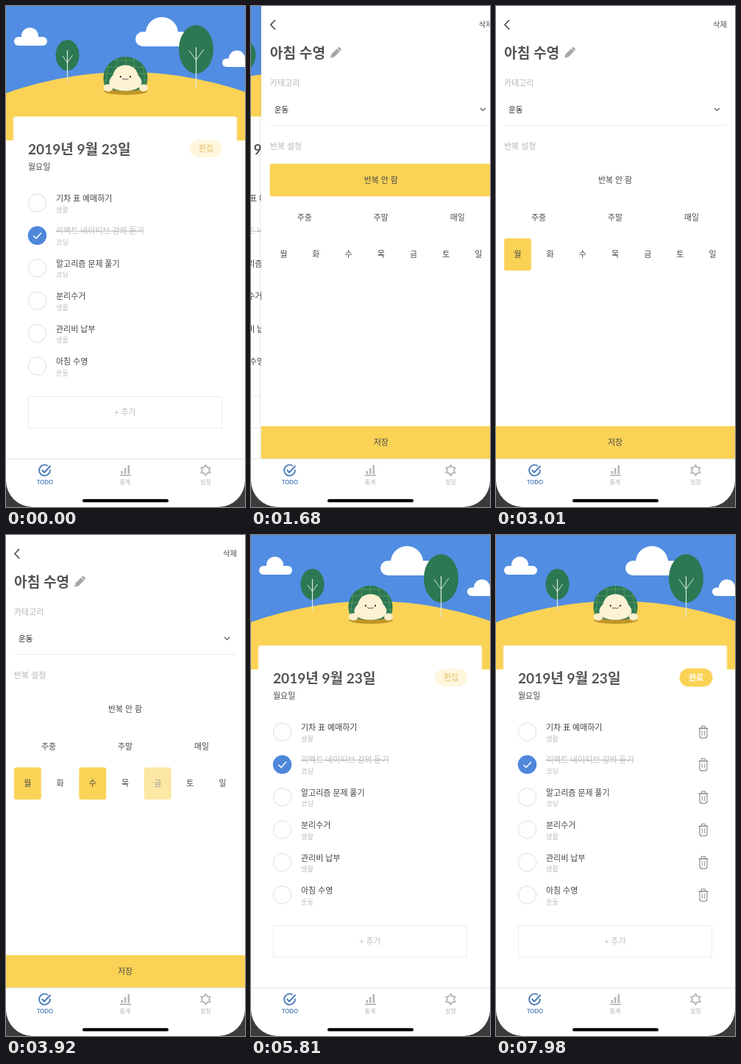
An HTML page with a canvas that plays this animation: 325x682 px, repeating every 8 s.

```html
<!DOCTYPE html>
<html lang="ko">
<head>
<meta charset="utf-8">
<title>Todo</title>
<style>
html, body { margin: 0; width: 100%; height: 100%; overflow: hidden; background: #fff; }
canvas { display: block; width: 325px; height: 682px; }
</style>
</head>
<body>
<canvas id="stage"></canvas>
<script>
const W = 325, H = 682, LOOP = 8000, TAB_Y = 616;
const YELLOW = '#fad255', BLUE = '#518de2', GREEN = '#2c7853', DARK = '#545454', GREY = '#b5b5b5';
const FONT = 'Lato, "Noto Sans CJK KR", "Noto Sans CJK JP", "Noto Sans", sans-serif';
const canvas = document.getElementById('stage');
const ctx = canvas.getContext('2d');
const ratio = window.devicePixelRatio || 1;
canvas.width = W * ratio;
canvas.height = H * ratio;

const clamp = v => Math.max(0, Math.min(1, v));
const inOut = v => v < 0.5 ? 2 * v * v : 1 - 2 * (1 - v) * (1 - v);
const outQuart = v => 1 - Math.pow(1 - v, 4);
const span = (t, start, length) => clamp((t - start) / length);

// Opacity of a touched control: down to 0.2, then back after release.
function touch(t, down, up) {
  const low = 1 - 0.8 * inOut(span(Math.min(t, up), down, 150));
  return low + (1 - low) * inOut(span(t, up, 250));
}

function text(str, x, cy, size, color, align = 'left', weight = 400) {
  ctx.font = `${weight} ${size}px ${FONT}`;
  ctx.textAlign = align;
  ctx.fillStyle = color;
  ctx.fillText(str, x, cy + size * 0.37);
}

function line(points, color, width = 1) {
  ctx.beginPath();
  points.forEach(([x, y], i) => i ? ctx.lineTo(x, y) : ctx.moveTo(x, y));
  ctx.strokeStyle = color;
  ctx.lineWidth = width;
  ctx.stroke();
}

function rect(x, y, w, h, color) {
  ctx.fillStyle = color;
  ctx.fillRect(x, y, w, h);
}

function pill(x, y, w, h, r, color) {
  ctx.beginPath();
  ctx.roundRect(x, y, w, h, r);
  ctx.fillStyle = color;
  ctx.fill();
}

function oval(x, y, rx, ry, color) {
  ctx.beginPath();
  ctx.ellipse(x, y, rx, ry, 0, 0, Math.PI * 2);
  ctx.fillStyle = color;
  ctx.fill();
}

function ring(x, y, r, color, width) {
  ctx.beginPath();
  ctx.arc(x, y, r, 0, Math.PI * 2);
  ctx.strokeStyle = color;
  ctx.lineWidth = width;
  ctx.stroke();
}

// Fades an area towards the white page.
function veil(x, y, w, h, opacity) {
  if (opacity < 1) rect(x, y, w, h, `rgba(255,255,255,${1 - opacity})`);
}

function yellowBox(x, y, w, h) {
  pill(x - 0.6, y - 0.6, w + 1.2, h + 1.2, 3.5, 'rgba(250,210,85,0.4)');
  pill(x, y, w, h, 3, YELLOW);
}

// A flat-bottomed pill with a round top sitting on it.
function cloud(x, y, w, h, bumpX, bumpY, r) {
  pill(x, y, w, h, h / 2, '#fff');
  ctx.beginPath();
  ctx.arc(bumpX, bumpY, r, Math.PI, Math.PI * 2);
  ctx.lineTo(bumpX + r, y + h / 2);
  ctx.lineTo(bumpX - r, y + h / 2);
  ctx.fill();
}

function tree(x, y, rx, ry, top, foot) {
  const pale = '#dcebd9', s = rx / 16;
  oval(x, y, rx, ry, GREEN);
  line([[x, top], [x, foot]], pale, 1.2);
  line([[x - 6.5 * s, y + s], [x, y + 10 * s]], pale, 1);
  line([[x + 7 * s, y], [x, y + 10 * s]], pale, 1);
}

function turtle() {
  oval(163, 116, 29.5, 5, '#bf9528');
  ctx.save();
  ctx.beginPath();
  ctx.ellipse(162.5, 97.5, 30, 28.5, 0, Math.PI, Math.PI * 2);
  ctx.quadraticCurveTo(193, 108, 186, 113);
  ctx.quadraticCurveTo(162.5, 118, 139, 113);
  ctx.quadraticCurveTo(132, 108, 132.5, 97.5);
  ctx.fillStyle = GREEN;
  ctx.fill();
  ctx.clip();
  for (let i = -2; i <= 2; i++) {
    const x = 162.5 + i * 11;
    line([[x, 68], [x + i * 3, 112]], '#6aa35a', 0.7);
    line([[130, 92 + i * 9], [195, 92 + i * 9]], '#6aa35a', 0.7);
  }
  ctx.restore();
  oval(139, 111.5, 6.5, 5, '#fbefcb');
  oval(187, 111.5, 6, 5, '#fbefcb');
  ctx.beginPath();
  ctx.moveTo(162.5, 80.5);
  ctx.bezierCurveTo(173, 80.5, 178, 87, 179.5, 94);
  ctx.bezierCurveTo(191, 106, 181, 115.5, 162.5, 115.5);
  ctx.bezierCurveTo(143, 115.5, 134, 106, 145.5, 94);
  ctx.bezierCurveTo(147, 87, 152, 80.5, 162.5, 80.5);
  ctx.fillStyle = '#fdf2d3';
  ctx.fill();
  oval(155.8, 96.3, 1, 1.2, '#222');
  oval(169, 96.3, 1, 1.2, '#222');
  ctx.beginPath();
  ctx.moveTo(158, 98.6);
  ctx.quadraticCurveTo(160, 101, 162.3, 99.2);
  ctx.quadraticCurveTo(164.6, 101, 166.6, 98.6);
  ctx.strokeStyle = '#444';
  ctx.lineWidth = 0.9;
  ctx.stroke();
}

function scenery() {
  rect(0, 0, W, 183, BLUE);
  ctx.save();
  ctx.beginPath();
  ctx.rect(0, 0, W, 183);
  ctx.clip();
  cloud(11, 42, 45, 12, 32.5, 41, 11.5);
  cloud(176, 35, 86, 20, 212, 37, 22);
  cloud(294, 71.5, 46, 11.5, 314, 71.5, 11);
  oval(165, 578, 488, 488, YELLOW);
  ctx.restore();
  tree(83.5, 67, 16, 21, 60, 103);
  tree(258.5, 59, 23.5, 33, 56, 112);
  turtle();
  pill(9.5, 150, 305, 40, 4, 'rgba(255,255,255,0.7)');
  pill(11, 151.5, 302, 40, 3, '#fff');
  rect(0, 183, W, TAB_Y - 183, '#fff');
}

function trash(x, y) {
  const c = '#858585';
  line([[x - 6.5, y - 4.8], [x + 6.5, y - 4.8]], c, 1.1);
  line([[x - 2.3, y - 5], [x - 2.3, y - 8], [x + 2.3, y - 8], [x + 2.3, y - 5]], c, 1);
  ctx.beginPath();
  ctx.roundRect(x - 5, y - 4.8, 10, 13.3, [0, 0, 3, 3]);
  ctx.lineWidth = 1.1;
  ctx.stroke();
  for (const dx of [-1.8, 1.8]) line([[x + dx, y - 1.8], [x + dx, y + 5]], c, 0.9);
}

const tasks = [
  ['기차 표 예매하기', '생활'], ['리액트 네이티브 강의 듣기', '코딩'], ['알고리즘 문제 풀기', '코딩'],
  ['분리수거', '생활'], ['관리비 납부', '생활'], ['아침 수영', '운동']
];

function taskRow([name, kind], i, t) {
  const y = 268 + 44.4 * i, done = i === 1;
  if (done) {
    oval(42.5, y, 12.7, 12.7, '#4f87da');
    line([[37.3, y + 0.3], [41, y + 4], [48, y - 3.6]], '#fff', 1.5);
  } else ring(42.5, y, 12.2, '#dedede', 1);
  text(name, 68, y - 6, 11, done ? '#bdbdbd' : '#444');
  if (done) line([[68, y - 6], [187, y - 6]], '#bdbdbd', 1);
  text(kind, 68, y + 9.1, 9.2, '#bcbcbc');
  if (i === 5) veil(64, y - 18, 200, 36, touch(t, 1050, 1330));
  const shown = inOut(span(t, 6580, 400));
  if (shown) {
    ctx.save();
    ctx.globalAlpha = shown;
    trash(282, y);
    ctx.restore();
  }
}

function listPage(t) {
  scenery();
  text('2019년 9월 23일', 30, 194.5, 19.1, DARK, 'left', 700);
  text('월요일', 30, 218.5, 11, '#4a4a4a');
  const editing = t >= 6580;
  if (editing) pill(249, 181, 46, 26, 13, '#fdeab4');
  pill(250, 182, 44, 24, 12, editing ? YELLOW : '#fff6de');
  text(editing ? '완료' : '편집', 272, 194.3, 11, editing ? '#fff' : '#e4bf63', 'center', editing ? 700 : 400);
  veil(248, 180, 48, 28, touch(t, 6440, 6580));
  tasks.forEach((task, i) => taskRow(task, i, t));
  ctx.strokeStyle = '#ececec';
  ctx.lineWidth = 1;
  ctx.strokeRect(30.5, 531.5, 263, 43);
  text('+ 추가', 162, 553.4, 11, '#bdbdbd', 'center');
}

function pencil() {
  ctx.save();
  ctx.translate(100.2, 63.8);
  ctx.rotate(Math.PI / 4);
  ctx.fillStyle = '#a6a6a6';
  ctx.fillRect(-2.7, -5.6, 5.4, 11.2);
  ctx.beginPath();
  ctx.roundRect(-2.7, -9.2, 5.4, 2.8, [1.2, 1.2, 0, 0]);
  ctx.moveTo(-2.7, 5.5);
  ctx.lineTo(2.7, 5.5);
  ctx.lineTo(0, 10);
  ctx.fill();
  ctx.restore();
}

// Day index to the times of press and release.
const taps = { 0: [2660, 2760], 2: [3220, 3320], 4: [3710, 3820] };

function detailPage(t) {
  const fade = ctx.createLinearGradient(-5, 0, 0, 0);
  fade.addColorStop(0, 'rgba(0,0,0,0)');
  fade.addColorStop(1, 'rgba(0,0,0,0.08)');
  rect(-5, 0, 5, TAB_Y, fade);
  rect(-1, 0, W + 1, TAB_Y, '#fff');
  line([[18, 19.2], [12, 25.5], [18, 31.8]], '#555', 1.7);
  text('삭제', 314, 25.5, 10.3, '#4a4a4a', 'right');
  text('아침 수영', 11, 64, 19.2, DARK, 'left', 700);
  pencil();
  text('카테고리', 11, 104.5, 11, GREY);
  text('운동', 17, 140.7, 10.5, '#222');
  line([[297, 139], [300.5, 142.5], [304, 139]], '#555', 1.1);
  line([[11, 162.5], [314, 162.5]], '#ececec');
  text('반복 설정', 11, 191, 11, GREY);
  if (t < taps[0][1]) yellowBox(11, 215, 303, 44);
  text('반복 안 함', 162, 237, 11, '#4a4a4a', 'center');
  ['주중', '주말', '매일'].forEach((s, i) => text(s, 58 + 104 * i, 287.5, 11, '#4a4a4a', 'center'));
  [...'월화수목금토일'].forEach((day, i) => {
    const x = 29.4 + 44.2 * i, tap = taps[i];
    if (tap && t >= tap[1]) yellowBox(x - 18.2, 316.5, 36.4, 43.5);
    text(day, x, 338.3, 11, '#4a4a4a', 'center');
    if (tap) veil(x - 20, 315, 40, 47, touch(t, ...tap));
  });
  rect(-1, 572, W + 1, TAB_Y - 572, YELLOW);
  text('저장', 162, 594.3, 11, '#4a4a4a', 'center');
  veil(-1, 571, W + 1, TAB_Y - 571, touch(t, 4830, 4992));
}

function gear(x, y, color) {
  ctx.beginPath();
  for (let i = 0; i < 12; i++) {
    const a = i * Math.PI / 6 - Math.PI / 2, r = i % 2 ? 4.5 : 7;
    ctx.lineTo(x + r * Math.cos(a), y + r * Math.sin(a));
  }
  ctx.closePath();
  ctx.strokeStyle = color;
  ctx.lineWidth = 1.8;
  ctx.stroke();
}

function tabBar() {
  const active = '#4c7cb8', idle = '#b4b4b4';
  rect(0, TAB_Y, W, H - TAB_Y, '#fff');
  rect(0, TAB_Y, W, 1, '#e3e3e3');
  ctx.beginPath();
  ctx.arc(52.5, 632, 7.4, -0.1, Math.PI * 2 - 0.95);
  ctx.strokeStyle = active;
  ctx.lineWidth = 1.9;
  ctx.stroke();
  line([[48.8, 631.5], [52, 635], [60.5, 626]], active, 2);
  text('TODO', 53, 648.2, 7.5, active, 'center', 700);
  rect(155, 638, 15, 1.7, idle);
  [[156.5, 4], [161, 8], [165.6, 12]].forEach(([x, h]) => rect(x, 637 - h, 2.4, h, idle));
  text('통계', 162, 648, 7.8, idle, 'center');
  gear(271.5, 632, idle);
  text('설정', 271.5, 648, 7.8, idle, 'center');
  pill(104, 671.2, 117, 4.4, 2.2, '#000');
  // Dark bottom corners of the screen.
  ctx.save();
  ctx.beginPath();
  ctx.rect(0, 600, W, H - 600);
  ctx.roundRect(0, 600, W, H - 600, [0, 0, 36, 36]);
  ctx.clip('evenodd');
  rect(0, 645, W, 37, '#3b3b3b');
  ctx.restore();
}

function draw(t) {
  ctx.setTransform(ratio, 0, 0, ratio, 0, 0);
  rect(0, 0, W, H, '#fff');
  const open = outQuart(span(t, 1412, 500)) - outQuart(span(t, 4998, 500));
  ctx.save();
  ctx.beginPath();
  ctx.rect(0, 0, W, TAB_Y);
  ctx.clip();
  if (open < 1) {
    ctx.save();
    ctx.translate(-W * 0.3 * open, 0);
    listPage(t);
    ctx.restore();
    rect(W * (1 - 0.3 * open), 0, W, TAB_Y, '#fff');
  }
  if (open > 0) {
    ctx.translate(W * (1 - open), 0);
    detailPage(t);
  }
  ctx.restore();
  tabBar();
}

function tick() {
  draw(performance.now() % LOOP);
  requestAnimationFrame(tick);
}
tick();
</script>
</body>
</html>
```
